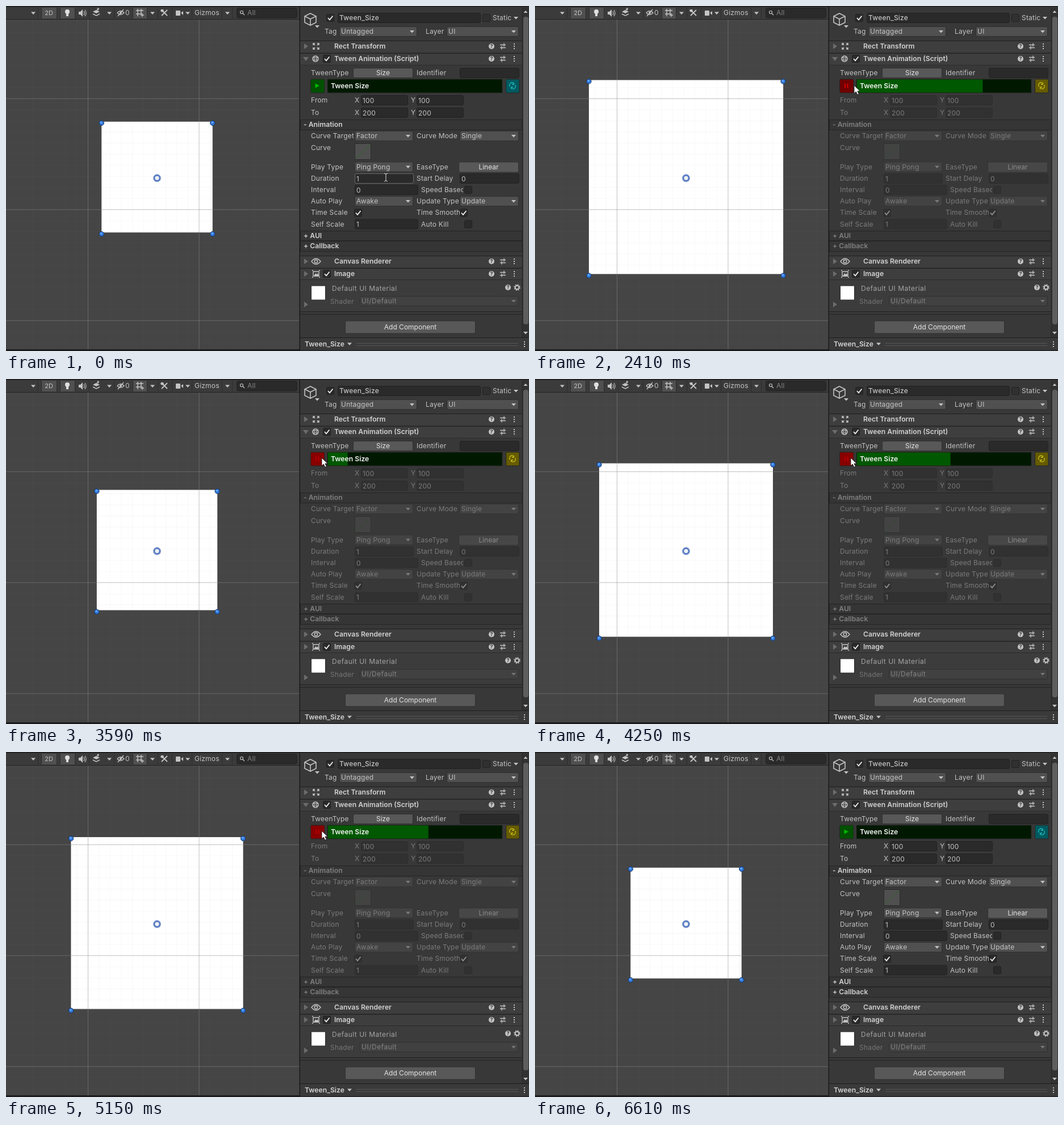
These frames come from a looping animation (921x608 px, 7.14 s). An HTML page:

```html
<!DOCTYPE html>
<html lang="en">
<head>
<meta charset="utf-8">
<title>Tween Size</title>
<style>
html, body { margin: 0; width: 100%; height: 100%; overflow: hidden; background: #383838; }
svg { display: block; }
text { font: 12px Inter, "Open Sans", sans-serif; letter-spacing: .2px; fill: #c4c4c4; white-space: pre; }
.bold { font-weight: 600; font-size: 12.2px; letter-spacing: 0; fill: #d2d2d2; }
.mid { text-anchor: middle; letter-spacing: 0; }
.wide { letter-spacing: .5px; }
.tiny { font-size: 9px; font-weight: 700; fill: #383838; text-anchor: middle; letter-spacing: 0; }
</style>
</head>
<body>
<svg id="stage" width="921" height="608" viewBox="0 0 921 608"></svg>
<script>
const LOOP = 7140, STEP = 47.22;
const PLAY_AT = 1674, STOP_AT = 5740, RESET_AT = 6045, RATE = 0.0009854;
const UNIT = 195.5, CENTER_X = 266, RECT_Y = 301.6, HANDLE_Y = 304;
const INK = '#c4c4c4', PANEL = '#383838';

let layer = document.getElementById('stage');

function set(node, attrs) {
  for (const key in attrs) node.setAttribute(key, attrs[key]);
  return node;
}
function add(tag, attrs = {}) {
  const node = set(document.createElementNS('http://www.w3.org/2000/svg', tag), attrs);
  layer.append(node);
  return node;
}
function group(draw, attrs) {
  const outer = layer, node = add('g', attrs);
  layer = node;
  draw();
  layer = outer;
  return node;
}
const rect = (x, y, width, height, fill, more) => add('rect', { x, y, width, height, fill, ...more });
const circle = (cx, cy, r, fill, more) => add('circle', { cx, cy, r, fill, ...more });
const line = (d, stroke = INK, width = 1, more) =>
  add('path', { d, stroke, fill: 'none', 'stroke-width': width, ...more });
const shape = (d, fill = INK, more) => add('path', { d, fill, ...more });
function text(x, y, content, cls = '', style = '') {
  add('text', { x, y: y + 4.3, class: cls, style }).textContent = content;
}
const arrowDown = (x, y, fill = INK) => shape(`M${x - 4} ${y - 2}h8l-4 4.5z`, fill);
const fold = (x, y, open) =>
  shape(open ? `M${x - 5} ${y - 3}h10l-5 7z` : `M${x - 3} ${y - 5}v10l7-5z`, '#6c6c6c');

function popup(x, y, width, label, dim) {
  rect(x + .5, y - 8.5, width - 1, 17, dim ? '#414141' : '#505050', { rx: 2.5, stroke: '#303030' });
  text(x + 3, y, label, dim ? 'wide' : '', dim ? 'fill:#858585' : '');
  arrowDown(x + width - 9, y, dim ? '#777' : INK);
}
function field(x, y, width, label = '') {
  const box = rect(x + .5, y - 8.5, width - 1, 17, '#2a2a2a', { rx: 2.5, stroke: '#222' });
  text(x + 3, y + .3, label);
  return box;
}
function button(x, y, width, height, label) {
  rect(x + .5, y - height / 2, width - 1, height, '#585858', { rx: 2.5, stroke: '#303030' });
  text(x + width / 2, y, label, 'mid', 'fill:#e4e4e4');
}
function check(x, y, on, fill = '#2a2a2a') {
  rect(x - 6.5, y - 6.5, 13, 13, fill, { rx: 2, stroke: '#212121' });
  if (on) line(`M${x - 4} ${y}l3 3.3l5.5-6.8`, '#f0f0f0', 1.8);
}
function dots(x, y) {
  for (const dy of [-4, 0, 4]) rect(x - 1, y + dy - 1, 2, 2, INK);
}
function help(x, y) {
  circle(x, y, 5, INK);
  text(x, y - 1, '?', 'tiny');
}
function component(y, title, open) {
  rect(518, y - 10, 391, 20, '#3e3e3e');
  line(`M518 ${y - 10}.5H909`, '#1f1f1f');
  fold(528, y, open);
  text(578, y, title, 'bold');
  help(855, y);
  line(`M870 ${y - 2.5}h10M870 ${y + 2.5}h10M877 ${y - 5.5}v6M873 ${y - .5}v6`, INK, 1.3);
  dots(895, y);
}

// Scene view
rect(0, 24, 517, 582, '#454545');
const square = rect(0, 0, 0, 0, '#fff');
for (const [pitch, opacity] of [[UNIT / 10, .06], [UNIT, .5]]) {
  let d = '';
  for (let x = 144.5 % pitch; x < 517; x += pitch) d += `M${x} 24V605`;
  for (let y = 24 + (163.3 - 24) % pitch; y < 605; y += pitch) d += `M0 ${y}H517`;
  line(d, '#888', 1, { opacity });
}
const edge = line('', '#555', 1, { opacity: .75 });
const handles = [[-1, -1], [1, -1], [-1, 1], [1, 1]].map(([sx, sy]) => {
  const node = group(() => {
    circle(0, 0, 4.2, '#2f78dc', { stroke: '#16345f' });
    circle(-.6, -1, 1.8, '#65a4f2');
  });
  return { node, sx, sy };
});
circle(266, 303.3, 5.3, '#eef0f4', { stroke: '#b8c4de', 'stroke-width': 4 });
circle(266, 303.3, 5, 'none', { stroke: '#5478c4', 'stroke-width': 2.4 });
rect(0, 605, 517, 3, '#1b1b1b');

// Scene toolbar
rect(0, 0, 517, 24, '#3b3b3b');
rect(0, 0, 921, 1.5, '#191919');
rect(0, 23, 517, 1, '#242424');
for (const [x, w] of [[63, 26], [96, 25], [224, 24]]) rect(x, 3, w, 19, '#505050');
for (const x of [56.5, 62.5, 89.5, 95.5, 121.5, 146.5, 190.5, 223.5, 248.5, 267.5, 292.5, 327.5, 380.5, 398.5])
  line(`M${x} 3v19`, '#2c2c2c');
for (const x of [48, 182, 258, 320, 390]) arrowDown(x, 12.5);
text(75.5, 12, '2D', 'mid', 'font-size:11px');
circle(108, 10, 4, '#e0e0e0');
rect(106, 13, 4, 5, '#e0e0e0');
shape('M128 10h3l4-4v13l-4-4h-3z');
line('M137 9q2 3 0 7M139 7q4 5 0 11', INK, 1.2);
shape('M153 10l6-3 6 3-6 3z');
line('M153 14l6 3 6-3', INK, 1.5);
line('M160 6l4-1m-2-2v5', INK, 1.3);
line('M196 12q5.500-6.500 12 0q-6.500 6.500-12 0M197 18l10-12', INK, 1.4);
circle(202, 12, 2, INK);
text(210, 12, '0');
line('M229 8h13M229 14h10M232 5v13M238 5v9', INK, 1.4);
line('M240 13v6M237 16h6', INK, 1.3);
line('M274 7l10 10M284 7l-10 10', INK, 1.8);
shape('M273 6h4l1 3-3 2-3-2z');
rect(299, 8, 8, 9, INK, { rx: 1 });
shape('M308 12l4-3v7z');
text(332, 12, 'Gizmos');
rect(406.5, 3.5, 106, 17.500, '#2a2a2a', { rx: 3, stroke: '#212121' });
circle(415, 11, 2.500, 'none', { stroke: INK, 'stroke-width': 1.2 });
line('M417 13l3 3', INK, 1.3);
text(425, 12, 'All', '', 'fill:#858585');

// Inspector header
rect(517, 1.5, 404, 607, PANEL);
rect(516.5, 0, 1.5, 608, '#191919');
line('M526 18l10-5 10 5v11l-10 5-10-5zM526 18l10 5 10-5M536 23v11', INK, 1.6);
arrowDown(548, 36);
check(571, 21, true);
field(584, 21, 252);
text(587, 21, 'Tween_Size', '', 'font-weight:500');
check(846, 21, false, '#303030');
text(857, 21, 'Static');
arrowDown(898, 21);
text(561, 45, 'Tag');
popup(587, 45, 137, 'Untagged');
text(739, 45, 'Layer');
popup(776, 45, 127, 'UI');

component(71, 'Rect Transform');
line('M541 66l3 3m4 0l3-3M541 76l3-3m4 0l3 3M541 69v-3h3m4 0h3v3M541 73v3h3m4 0h3v-3', INK, 1.5);
component(93, 'Tween Animation (Script)', true);
line('M518 104.500H909', '#303030');
circle(545, 93, 5, 'none', { stroke: INK, 'stroke-width': 1.5 });
line('M540 91h10M540 95h10M543 88v10M547 88v10', INK, 1);
check(565, 93, true);

text(537, 118, 'TweenType');
button(611, 118, 106, 17, 'Size');
text(723, 118, 'Identifier');
field(799, 118, 105);

// Player row
const playButton = rect(536.5, 129, 24.500, 24, '#005000', { rx: 2, stroke: '#252525' });
const playIcon = shape('M544.500 136.500v8l7.500-4z', '#00b800');
const pauseIcon = shape('M545 136.500h2v8h-2zM549.500 136.500h2v8h-2z', '#d40000');
rect(566, 129, 308, 24, '#001800', { stroke: '#292929' });
const bar = rect(567, 129.500, 0, 23, '#005800');
text(572, 141, 'Tween Size', 'bold', 'fill:#f2f2f2');
const resetButton = rect(880.500, 129, 23.500, 24, '#005a60', { rx: 2, stroke: '#252525' });
const resetIcon = line('M887.500 142a4.500 4.500 0 0 1 7.500-5m-1-2v3h-3M896.500 139a4.500 4.500 0 0 1-7.500 5m1 2v-3h3', '#20c4c8', 1.3);

// Section bands
for (const [y, h] of [[200, 18], [396, 17], [414, 18]])
  rect(518.500, y + .5, 390, h, '#353535', { stroke: '#252525' });

// Settings that dim during playback
let durationBox;
const settings = group(() => {
  for (const [y, label, value] of [[166, 'From', '100'], [188, 'To', '200']]) {
    text(537, y, label);
    text(614, y, 'X');
    field(625, y, 83, value);
    text(713, y, 'Y');
    field(723, y, 83, value);
  }
  text(524, 209, '- Animation', 'bold');
  text(524, 405, '+ AUI', 'bold');
  text(524, 423, '+ Callback', 'bold');

  const labels = [
    [229, 'Curve Target', 'Curve Mode'], [250, 'Curve', ''],
    [284, 'Play Type', 'EaseType'], [304, 'Duration', 'Start Delay'],
    [324, 'Interval', ''], [344, 'Auto Play', 'Update Type'],
    [364, 'Time Scale', 'Time Smooth'], [384.500, 'Self Scale', '']
  ];
  for (const [y, left, right] of labels) {
    text(537, y, left);
    text(723, y, right);
  }
  text(731, 324, 'Speed Based');
  text(731, 384.500, 'Auto Kill');
  rect(612.500, 219.500, 8, 18, PANEL);
  rect(805, 315, 20, 18, PANEL);
  rect(799, 355, 20, 18, PANEL);

  popup(614, 229, 103, 'Factor');
  popup(799, 229, 104, 'Single');
  rect(614.500, 242.500, 28, 28, '#505050', { stroke: '#2b2b2b' });
  line('M616 269L641 244', '#266326');
  popup(614, 283.500, 103, 'Ping Pong');
  button(797, 284, 106, 18, 'Linear');
  durationBox = field(614, 304, 104, '1');
  field(799, 304, 105, '0');
  field(614, 324, 112, '0');
  check(814, 324, false);
  popup(614, 344, 103, 'Awake');
  popup(799, 344, 104, 'Update');
  check(620, 364.500, true);
  check(806, 364.500, true);
  field(614, 384.500, 112, '1');
  check(814, 384.500, false);
});

// Remaining components
component(450, 'Canvas Renderer');
line('M538 450q8-10 16 0q-8 10-16 0z', INK, 1.4);
circle(546, 450, 2.700, 'none', { stroke: INK, 'stroke-width': 1.5 });
component(472, 'Image');
line('M541 468h10v8h-10zM539 466h2M551 466h2M539 478h2M551 478h2', INK, 1.4);
shape('M542 476l3-5 2 2 2-2 2 5z');
check(565, 472, true);
line('M518 482.500H909', '#2a2a2a');
rect(518, 483, 391, 56, '#3c3c3c');
rect(537.500, 493, 25, 25, '#fff', { stroke: '#2a2a2a' });
fold(528, 526, false);
text(574, 497.500, 'Default UI Material', 'wide', 'fill:#a4a4a4');
help(884, 496);
circle(900, 496, 3.300, 'none', { stroke: INK, 'stroke-width': 2 });
circle(900, 496, 5, 'none', { stroke: INK, 'stroke-width': 1.5, 'stroke-dasharray': '2 1.930' });
text(571, 520.500, 'Shader', '', 'fill:#757575');
popup(623, 520, 280, 'UI/Default', true);
line('M518 538.500H909M518 543.500H909', '#222');
button(597, 566, 230, 22, 'Add Component');

// Scrollbar and footer
rect(909, 1.5, 12, 583, '#323232');
line('M909 2V584', '#292929');
rect(911, 19, 9, 542, '#5e5e5e', { rx: 4 });
shape('M911.500 12h7l-3.500-4z');
arrowDown(915, 576);
line('M518 584.500H921', '#1d1d1d');
rect(518, 585, 403, 23, '#3a3a3a');
text(526, 596, 'Tween_Size', 'bold');
arrowDown(605, 595.500);
line('M617 594.500H902M617 598.500H902', '#565656');
dots(913, 596);
rect(518, 606, 403, 2, '#2a2a2a');

// Pointer
const arrow = shape('M0 0v14l3.300-3 2.500 5.300 2.500-1.100-2.400-5.200h4.500z', '#fff', { stroke: '#111', 'stroke-width': .8 });
const beam = line('M-3-7q3 0 3 2q0-2 3-2M0-5V5M-3 7q3 0 3-2q0 2 3 2', '#ddd', 1);

const pointerPath = [
  [0, 669, 302], [760, 562, 140], [900, 556, 139], [1070, 556, 139],
  [1180, 563, 142], [1280, 553, 138], [1490, 553, 138], [1640, 552, 137],
  [1800, 552, 137], [2000, 562, 140], [2600, 562, 140], [2750, 556, 139],
  [6220, 556, 139], [6600, 905, 612], [LOOP, 905, 612]
];
function pointerAt(t) {
  const n = pointerPath.findIndex(point => point[0] > t);
  const [t0, x0, y0] = pointerPath[n - 1], [t1, x1, y1] = pointerPath[n];
  const u = (t - t0) / (t1 - t0), k = u * u * (3 - 2 * u);
  return [x0 + (x1 - x0) * k, y0 + (y1 - y0) * k];
}
const pingPong = e => 1 - Math.abs(1 - e % 2);
const show = (node, on) => set(node, { visibility: on ? 'visible' : 'hidden' });

function drawSquare(factor) {
  const half = UNIT * (1 + factor) / 2, left = CENTER_X - half, top = RECT_Y - half;
  set(square, { x: left, y: top, width: 2 * half, height: 2 * half });
  set(edge, { d: `M${left} ${top + 2 * half}h${2 * half}` });
  for (const { node, sx, sy } of handles)
    set(node, { transform: `translate(${CENTER_X + sx * half} ${HANDLE_Y + sy * half})` });
}

function render(time) {
  // The screen refreshes in discrete steps.
  const t = Math.floor((time % LOOP + 5) / STEP) * STEP % LOOP;
  const playing = t >= PLAY_AT && t < STOP_AT;
  const elapsed = playing ? (t - PLAY_AT) * RATE : 0;
  drawSquare(playing ? pingPong(Math.min(elapsed + .027, 4)) : 0);
  set(bar, { width: 306 * pingPong(elapsed) });

  const [x, y] = pointerAt(t);
  const hover = x < 561 && y < 153;
  const typing = x > 614 && x < 718 && y > 295 && y < 313;
  set(playButton, { fill: playing ? (hover ? '#880000' : '#700000') : (hover ? '#087408' : '#005000') });
  set(playIcon, { fill: hover ? '#0a9a0a' : '#00b800' });
  set(pauseIcon, { fill: hover ? '#b80000' : '#d40000' });
  show(playIcon, !playing);
  show(pauseIcon, playing);

  const active = t >= PLAY_AT && t < RESET_AT;
  set(resetButton, { fill: active ? '#665c00' : '#005a60' });
  set(resetIcon, { stroke: active ? '#d2c420' : '#20c4c8' });
  set(settings, { opacity: playing ? .48 : 1 });
  set(durationBox, { stroke: typing ? '#686868' : '#222' });

  show(arrow, !typing);
  show(beam, typing);
  set(typing ? beam : arrow, { transform: `translate(${x} ${y})` });
}

function tick() {
  render(performance.now());
  requestAnimationFrame(tick);
}
tick();
</script>
</body>
</html>
```
